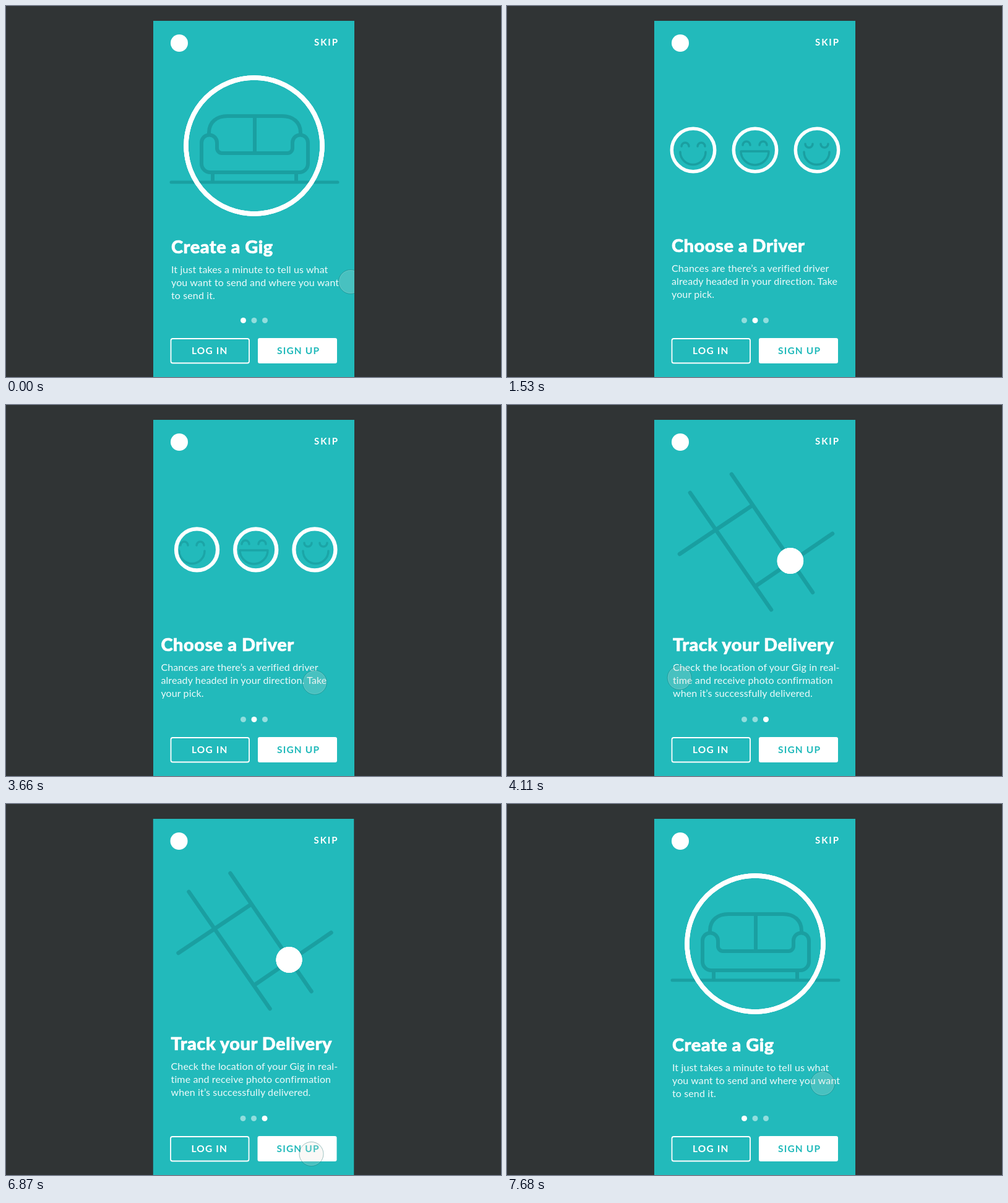
An HTML page that plays this animation: 800 px wide and 600 px high, repeating every 7.71 s.

```html
<!DOCTYPE html>
<html lang="en">
<head>
<meta charset="utf-8">
<title>Onboarding</title>
<style>
  html, body { margin: 0; width: 100%; height: 100%; overflow: hidden; background: #303435; }
  #stage { display: block; width: 800px; height: 600px; }
  text { font-family: Lato, "Open Sans", sans-serif; fill: #fff; white-space: pre; }
  .title { font-size: 29px; font-weight: 800; letter-spacing: .5px; stroke: #fff; stroke-width: .7px; }
  .body { font-size: 16px; letter-spacing: .12px; fill: #eefafa; }
  .label { font-size: 15.5px; font-weight: 700; letter-spacing: 1.15px; }
  .art { fill: none; stroke: #1a9fa1; stroke-linecap: round; stroke-linejoin: round; }
  .ring { fill: none; stroke: #fff; }
</style>
</head>
<body>
<svg id="stage" viewBox="0 0 800 600">
  <svg id="phone" x="238" y="24" width="325" height="576" viewBox="238 24 325 576">
    <rect x="238" y="24" width="325" height="576" fill="#22babb"/>
    <circle cx="280" cy="60" r="14" fill="#fff"/>
    <text class="label" x="498" y="64" style="font-size:15px;letter-spacing:1.9px">SKIP</text>

    <g id="sofa" class="art" stroke-width="6">
      <path d="M267 285H536" stroke-width="5"/>
      <path d="M334 270V283M469 270V283M402 178V238"/>
      <path d="M328 207V205C328 188 340 178 358 178H446C464 178 476 188 476 205V207"/>
      <path d="M341 221a12.5 12.5 0 0 0-25 0V255a14 14 0 0 0 14 14H474a14 14 0 0 0 14-14V221
               a12.5 12.5 0 0 0-25 0V230a8 8 0 0 1-8 8H349a8 8 0 0 1-8-8Z"/>
    </g>

    <g id="faces" class="art" stroke-width="3.5">
      <path d="M282 227a6 6 0 0 1 12 0M308 227a6 6 0 0 1 12 0M280 236a20.5 20.5 0 0 0 41 0"/>
      <path d="M381 225a6 6 0 0 1 12 0M408 225a6 6 0 0 1 12 0M378 235H423a22.5 22 0 0 1-45 0Z"/>
      <path d="M482 223a6 6 0 0 0 12 0M507 223a6 6 0 0 0 12 0M480 236a20.5 20.5 0 0 0 41 0"/>
    </g>

    <path id="map" class="art" stroke-width="6.5"
          d="M296 142L427 331M363 112L494 303M279 241L397 162M403 292L526 208"/>

    <circle class="ring"/><circle class="ring"/><circle class="ring"/>
    <g id="pages"></g>

    <circle class="dot" cx="383.5" cy="508.5" r="4.5" fill="#fff"/>
    <circle class="dot" cx="401" cy="508.5" r="4.5" fill="#fff"/>
    <circle class="dot" cx="418.5" cy="508.5" r="4.5" fill="#fff"/>

    <rect x="266.5" y="538" width="126.5" height="39.5" rx="3" fill="none" stroke="#fff" stroke-width="1.8"/>
    <text class="label" x="300" y="563">LOG IN</text>
    <rect x="407" y="537" width="128" height="41" rx="3" fill="#fff"/>
    <text class="label" x="438" y="563" style="fill:#22babb">SIGN UP</text>

    <g id="touch">
      <circle r="19.5" fill="#dedccf" fill-opacity=".2"/>
      <circle r="19.5" fill="none" stroke="#106c6c" stroke-opacity=".4"/>
      <circle r="18.4" fill="none" stroke="#fff" stroke-opacity=".12"/>
    </g>
  </svg>
</svg>
<script>
const LOOP = 7710, PAGE = 325, HALF_SLIDE = 563;
const $ = id => document.getElementById(id);
const rings = document.querySelectorAll('.ring');
const dots = document.querySelectorAll('.dot');
const clamp = v => Math.min(1, Math.max(0, v));
const lerp = (a, b, k) => a + (b - a) * k;
const set = (el, attrs) => { for (const k in attrs) el.setAttribute(k, attrs[k]); };

const pages = [
  [267, 400, 'Create a Gig', 'It just takes a minute to tell us what',
    'you want to send and where you want', 'to send it.'],
  [266, 398, 'Choose a Driver', 'Chances are there’s a verified driver',
    'already headed in your direction. Take', 'your pick.'],
  [267, 398, 'Track your Delivery', 'Check the location of your Gig in real-',
    'time and receive photo confirmation', 'when it’s successfully delivered.'],
];
$('pages').innerHTML = pages.map(([x, y, title, ...lines], i) => {
  const left = x + i * PAGE;
  return `<text class="title" x="${left}" y="${y}">${title}</text>` + lines.map((line, j) =>
    `<text class="body" x="${left}" y="${y + 32 + j * 20.8}">${line}</text>`).join('');
}).join('');

// Finger keys: time, x, y, opacity
const fingerKeys = [
  [0, 557, 446, 1], [480, 510, 452, 1], [1200, 510, 452, 1], [1480, 510, 452, 0],
  [2190, 500, 472, 0], [2550, 505, 510, 1], [2970, 502, 481, 1], [3300, 510, 449, 1],
  [3600, 510, 449, 1], [4150, 510, 441, 1], [4340, 510, 441, 0],
  [4380, 510, 488, 0], [4680, 510, 488, 1], [5790, 510, 488, 1], [6180, 494, 566, 1],
  [7064, 494, 566, 1], [7065, 590, 446, 1], [7330, 590, 446, 1], [7620, 510, 452, 1],
  [LOOP, 510, 452, 1],
];

function finger(t) {
  const i = fingerKeys.findIndex(key => key[0] > t);
  const a = fingerKeys[i - 1], b = fingerKeys[i];
  const k = (t - a[0]) / (b[0] - a[0]);
  const eased = k * k * (3 - 2 * k);
  return [1, 2, 3].map(n => lerp(a[n], b[n], eased));
}

// Quick start with a soft, long landing
const settle = (t, start, scale) =>
  t < start ? 0 : 1 - Math.exp(-(((t - start) / scale) ** 2.54));

function draw(t) {
  const first = settle(t, 820, 265), second = settle(t, 3580, 265);
  const slide = 2 * HALF_SLIDE * settle(t, 6860, 237.5);
  const leaving = slide < HALF_SLIDE;
  const p = leaving ? first + second : 0;
  const a = clamp(p), b = clamp(p - 1);

  set($('phone'), { x: 238 + (leaving ? -slide : 2 * HALF_SLIDE - slide) });
  set($('pages'), { transform: `translate(${-PAGE * p})` });
  set($('sofa'), { opacity: clamp(1 - 2 * a) });
  set($('faces'), { opacity: clamp(a * 5 - 4) * clamp(1 - 5 * b) });
  set($('map'), { opacity: clamp(2 * b - 1) });

  rings.forEach((ring, i) => set(ring, {
    cx: lerp(401 + (i - 1) * 100 * a, 458, b),
    cy: lerp(lerp(226, 233, a), 252, b),
    r: lerp(lerp(110, 34.7, a), 10.5, b),
    'stroke-width': lerp(lerp(7.4, 5.5, a), 21, b),
  }));
  dots.forEach((dot, i) => set(dot, { opacity: 0.5 + 0.5 * clamp(1 - Math.abs(p - i)) }));

  const [x, y, opacity] = finger(t);
  const drag = t < 2000 ? 239 * first : t < 4360 ? 232 * second : 0;
  set($('touch'), { transform: `translate(${x - drag} ${y})`, opacity });
}

const begin = performance.now();
function tick() {
  draw((performance.now() - begin) % LOOP);
  requestAnimationFrame(tick);
}
tick();
</script>
</body>
</html>
```
